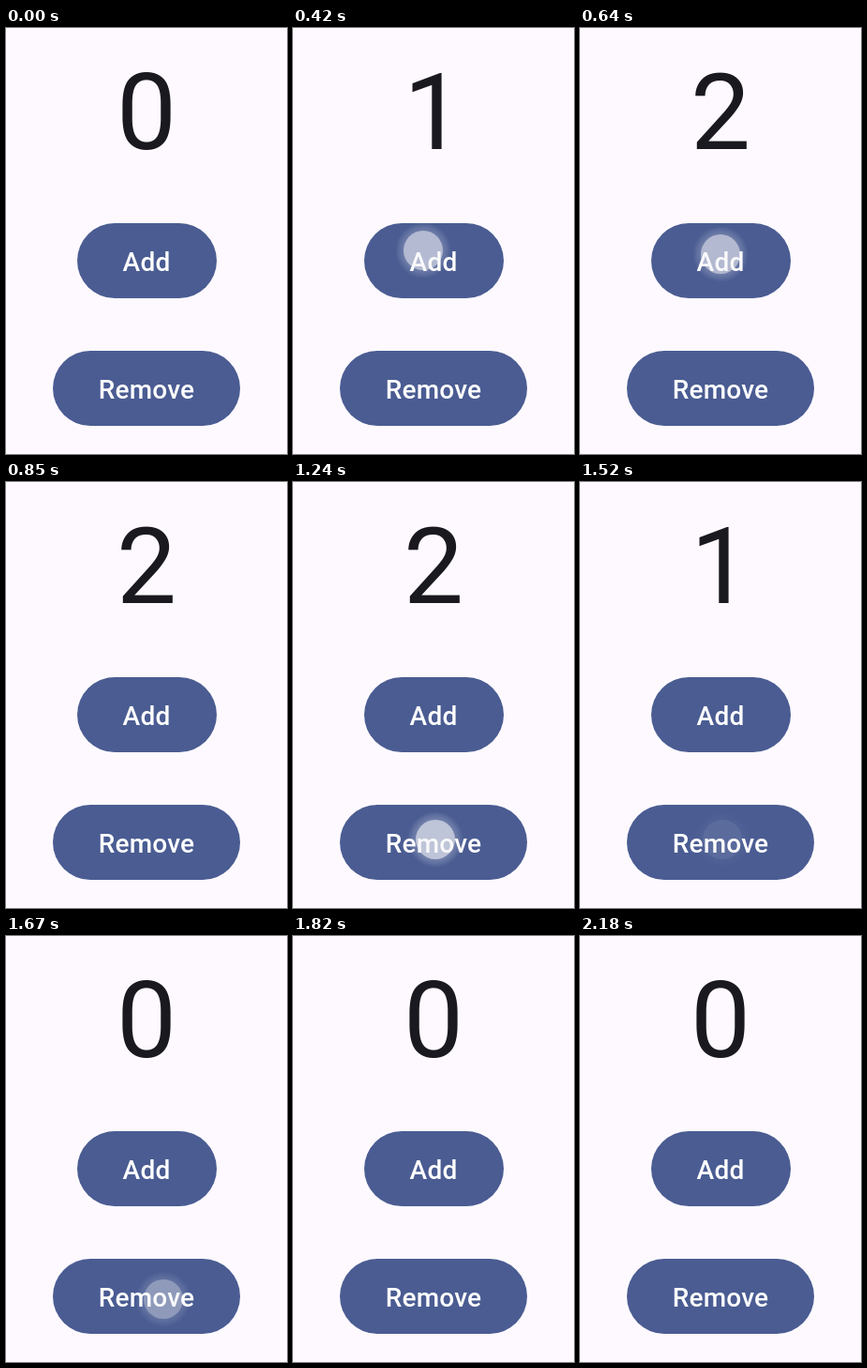
Animation, 300 px wide and 454 px high, one loop 2210 ms. Source, as an HTML page:

```html
<!DOCTYPE html>
<html lang="en">
<head>
<meta charset="utf-8">
<title>Counter</title>
<style>
  html, body { margin: 0; width: 100%; height: 100%; overflow: hidden; background: #fef9ff; }
  svg { display: block; width: 100%; height: 100%; }
  text { font-family: Roboto, sans-serif; text-anchor: middle; }
  #count { font-size: 114px; fill: #1a191f; }
  .button rect { fill: #4a5c92; }
  .button text { font-size: 28px; font-weight: 500; letter-spacing: .2px; fill: #fff; }
</style>
</head>
<body>
<svg viewBox="0 0 300 454">
  <defs>
    <radialGradient id="glow">
      <stop offset=".68" stop-color="#fff" stop-opacity=".24"/>
      <stop offset=".84" stop-color="#fff" stop-opacity=".13"/>
      <stop offset="1" stop-color="#fff" stop-opacity="0"/>
    </radialGradient>
  </defs>
  <text id="count" x="150" y="129">0</text>
  <g class="button">
    <rect x="76" y="208" width="149" height="80" rx="40"/>
    <text x="150" y="259">Add</text>
  </g>
  <g class="button">
    <rect x="50" y="344" width="200" height="80" rx="40"/>
    <text x="150" y="395">Remove</text>
  </g>
  <g id="touch" opacity="0">
    <circle r="30" fill="url(#glow)"/>
    <circle r="21" fill="#f4f4f8" fill-opacity=".58"/>
  </g>
</svg>
<script>
  const LOOP = 2210;
  const count = document.getElementById('count');
  const touch = document.getElementById('touch');

  // Each tap: position, press time, count change, fade start and fade end.
  const taps = [
    { x: 139, y: 237, down: 300, step: 390, fade: 405, end: 570, add: 1 },
    { x: 150, y: 241, down: 580, step: 620, fade: 620, end: 820, add: 1 },
    { x: 152, y: 381, down: 1240, step: 1370, fade: 1380, end: 1545, add: -1 },
    { x: 168, y: 387, down: 1560, step: 1620, fade: 1610, end: 1760, add: -1 }
  ];

  const clamp = v => Math.min(1, Math.max(0, v));

  function draw(t) {
    const total = taps.reduce((sum, tap) => sum + (t >= tap.step ? tap.add : 0), 0);
    if (count.textContent !== String(total)) count.textContent = total;

    const tap = taps.find(p => t >= p.down && t < p.end);
    if (!tap) return touch.setAttribute('opacity', 0);
    touch.setAttribute('transform', `translate(${tap.x} ${tap.y})`);
    touch.setAttribute('opacity', clamp((tap.end - t) / (tap.end - tap.fade)));
  }

  const start = performance.now();
  function tick() {
    draw((performance.now() - start) % LOOP);
    requestAnimationFrame(tick);
  }
  tick();
</script>
</body>
</html>
```
